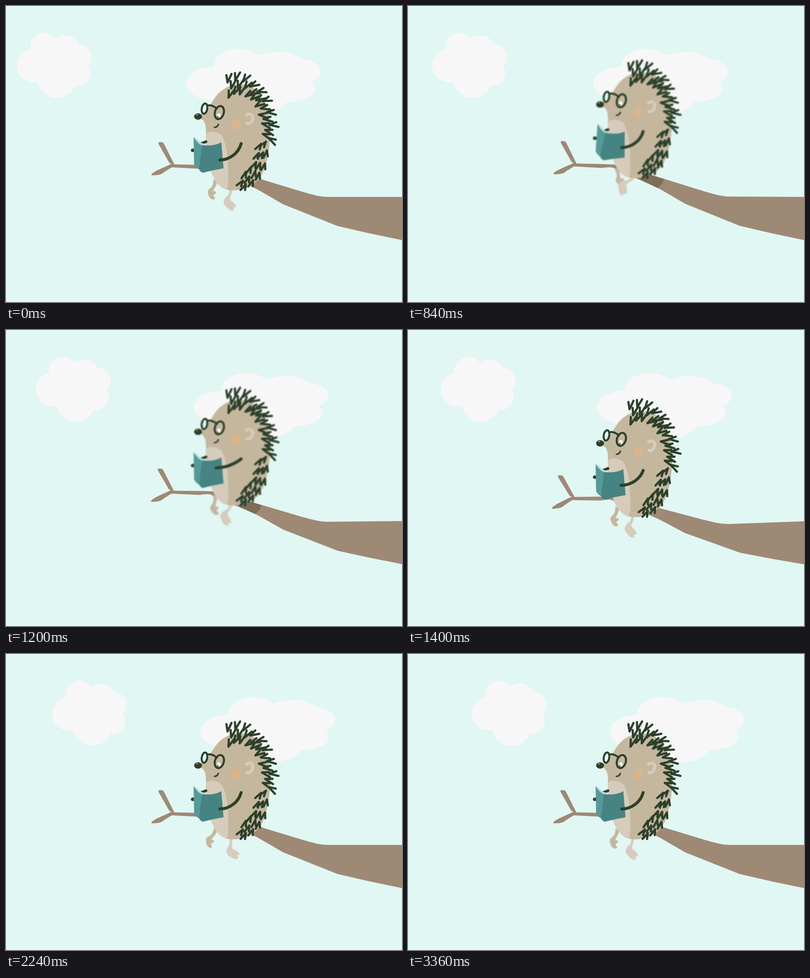
An HTML page with a canvas that plays this animation: 800 px wide and 600 px high, repeating every 3.4 s.

```html
<!DOCTYPE html>
<html lang="en">
<head>
<meta charset="utf-8">
<title>Reading hedgehog</title>
<style>
html, body { margin: 0; width: 100%; height: 100%; overflow: hidden; background: #e0f7f4; }
canvas { display: block; }
</style>
</head>
<body>
<canvas id="stage" width="800" height="600"></canvas>
<script>
const LOOP = 3400, W = 800, H = 600, RAD = Math.PI / 180;
const main = document.getElementById('stage').getContext('2d');
const layer = document.createElement('canvas');
layer.width = W;
layer.height = H;
const ctx = layer.getContext('2d');

const C = {
  sky: '#e0f7f4', cloud: '#f7f7f7', bark: '#9e8974', shade: '#7f6d55',
  fur: '#c5b79e', pale: '#d7ccbb', dark: '#2b402b', cheek: '#dbb58a',
  cover: '#458482', inside: '#559a99', page: '#b9dfdc'
};

// Eases from 0 up to 1 at the peak and back to 0.
function bump(t, from, peak, to) {
  if (t <= from || t >= to) return 0;
  const u = t < peak ? (peak - t) / (peak - from) : (t - peak) / (to - peak);
  return (1 + Math.cos(Math.PI * u)) / 2;
}

// Crouch, jump and landing; the branch, book, arm and feet follow.
function poseAt(t) {
  const crouch = bump(t, 0, 600, 740), jump = bump(t, 660, 1000, 1360);
  const arm = bump(t, 800, 1150, 1500);
  const dangle = t > 1600 && t < 3360 ? 24 * Math.sin(2 * Math.PI * (t - 1600) / 704) : 0;
  const feet = 43 * bump(t, 0, 650, 1600) + dangle;
  return {
    rise: 5.5 * crouch - 48 * jump + 4 * bump(t, 1320, 1420, 1650) - 2 * bump(t, -300, 0, 300),
    lean: crouch,
    bend: 4.1 * bump(t, 0, 620, 850) - 2.35 * bump(t, 800, 1000, 1250) + 2.2 * bump(t, 1100, 1350, 1700),
    glasses: 5.5 * bump(t, 800, 1000, 1200) - 6 * bump(t, 300, 600, 800),
    book: bump(t, 760, 1000, 1200),
    armX: -8 * arm,
    armY: -16 * arm,
    front: feet,
    back: -.85 * feet,
    airborne: t > 700 && t < 1400
  };
}

function fill(g, path, color) {
  g.fillStyle = color;
  g.fill(new Path2D(path));
}

function line(path, color, width) {
  ctx.strokeStyle = color;
  ctx.lineWidth = width;
  ctx.stroke(new Path2D(path));
}

function oval(g, x, y, rx, ry, color, turn = 0) {
  g.beginPath();
  g.ellipse(x, y, rx, ry, turn * RAD, 0, 7);
  g.fillStyle = color;
  g.fill();
}

function ring(x, y, rx, ry, turn) {
  ctx.beginPath();
  ctx.ellipse(x, y, rx, ry, turn * RAD, 0, 7);
  ctx.strokeStyle = C.dark;
  ctx.lineWidth = 4;
  ctx.stroke();
}

function turned(g, x, y, deg, draw) {
  g.save();
  g.translate(x, y);
  g.rotate(deg * RAD);
  g.translate(-x, -y);
  draw();
  g.restore();
}

function clouds(t) {
  const puff = (x, y, rx, ry = rx) => oval(main, x, y, rx, ry, C.cloud);
  main.save();
  main.translate(t * .0317, 0);
  puff(77, 82, 28);
  puff(119, 92, 32);
  puff(147, 103, 26);
  puff(144, 136, 26);
  puff(103, 146, 40);
  puff(56, 121, 34);
  puff(100, 115, 36);
  main.restore();

  main.save();
  main.translate(t * .0129, 0);
  puff(420, 157, 56, 34);
  puff(470, 119, 49, 32);
  puff(550, 128, 60, 35);
  puff(595, 133, 41, 25);
  puff(570, 168, 54, 27);
  puff(505, 178, 68, 42);
  puff(500, 145, 60, 35);
  main.restore();
}

function branch(p) {
  turned(main, 821, 425, -p.bend, () => {
    fill(main, `M870 387 L650 387 C635 387 618 382 600 377 L515 351 L475 339 L420 323 L387 322 L340 321
      L319 279 Q317 275 309 276 Q307 277 309 281 L330 318 L334 320 C320 327 298 335 294 341
      Q292 344 300 343 Q313 343 319 337 Q328 331 335 327 L392 330 Q404 328 413 329 L430 337
      L455 347 L488 362 L510 373 L560 402 L670 446 L735 461 L870 489 Z`, C.bark);
    if (p.airborne) fill(main, 'M460 350 Q474 340 488 343 L517 352 Q514 363 504 370 Z', C.shade);
  });
}

// Pairs of bristles around the back, fanned at the head and combed down below.
function makeSpikes() {
  let seed = 29;
  const jitter = n => n * ((seed = (seed * 16807) % 2147483647) / 2147483647 - .5);
  const path = new Path2D(), count = 42;
  for (let i = 0; i < count; i++) {
    const a = -113 + 192 * i / (count - 1), ring = .82 + .12 * (i * 2 % 3) + jitter(.06);
    const x = 468 + 60 * ring * Math.cos(a * RAD), y = 262 + 102 * ring * Math.sin(a * RAD);
    const low = a > 8, heading = (low ? 112 : -80 + .85 * (a + 113)) + jitter(30);
    for (const side of [-1, 1]) {
      const dir = (heading + side * 17) * RAD, len = (low ? 14 : 17) + side * 2;
      path.moveTo(x, y);
      path.lineTo(x + len * Math.cos(dir), y + len * Math.sin(dir));
    }
  }
  return path;
}
const spikes = makeSpikes();

function legs(p) {
  turned(ctx, 423, 359, p.back, () => fill(ctx, `M419 354 L427 356 C426 368 419 372 419 378
    C425 376 426 382 421 384 Q418 385 420 388 Q424 391 421 394 C413 396 409 388 408 381
    C406 375 412 372 415 369 Q419 364 419 354 Z`, C.fur));
  turned(ctx, 454, 375, p.front, () => fill(ctx, `M451 370 L457 371 C457 384 452 388 453 394
    C456 400 463 401 462 404 Q466 407 464 410 Q462 411 459 409 Q462 414 459 417
    C452 419 446 410 441 405 C437 398 443 390 447 387 C451 383 451 379 451 370 Z`, C.pale));
}

function body() {
  fill(ctx, `M393 222 C405 219 411 205 420 191 C438 163 465 157 490 163 C520 174 537 222 534 262
    C531 310 522 350 500 363 C480 375 465 377 450 375 C430 371 418 350 413 333
    C406 310 403 285 404 258 C404 243 402 234 393 230 Z`, C.fur);
  fill(ctx, `M404 262 C408 254 426 256 435 264 C445 278 450 312 449 352 C449 365 448 372 445 374
    C430 371 418 350 413 335 C406 310 403 285 404 262 Z`, C.pale);
  oval(ctx, 465, 243, 8.5, 11, C.cheek, 24);
  line('M486 223 C492 218 501 223 498 232 C496 239 490 242 487 240', C.pale, 6);
  ctx.strokeStyle = C.dark;
  ctx.lineWidth = 4.4;
  ctx.stroke(spikes);
}

function face(p) {
  oval(ctx, 388, 226, 8, 6.5, C.dark);
  oval(ctx, 386, 222.5, 2.2, 1, C.fur);
  line('M421 248 Q427 248 429 242', C.dark, 3);
  oval(ctx, 430, 224, 3.4, 4.6, '#fff');
  oval(ctx, 428, 227, 1.4, 1.8, C.dark);
  ctx.save();
  ctx.translate(0, p.glasses);
  oval(ctx, 401, 210, 5, 10, C.sky, 10);
  ring(401, 210, 5.6, 10.5, 10);
  ring(431, 218, 9, 13.5, 16);
  line('M407 204 C414 201 421 206 426 210', C.dark, 4);
  ctx.restore();
}

function book(p) {
  line('M394 281 L404 277', C.dark, 5.5);
  oval(ctx, 377.5, 294.5, 4, 3.5, C.dark);
  ctx.save();
  ctx.translate(2 * p.book, p.book);
  turned(ctx, 409, 305, 20 * p.book, () => {
    fill(ctx, 'M379 268 Q385 270 389 275 Q395 282 405 281 L398 286 L388 280 Z', C.page);
    fill(ctx, 'M379 268 C384 275 389 282 397 285 L392 334 Q384 331 380 323 Z', C.inside);
    fill(ctx, 'M396 284 C412 286 426 284 435 278 L439.5 331 Q416 335 398 340 Q393 339 390 333 Z', C.cover);
  });
  ctx.restore();
  const x = 432 + p.armX, y = 314 + p.armY;
  line(`M475 281 C470 ${y - 14} 452 ${y} ${x} ${y}`, C.dark, 6);
}

function hedgehog(p) {
  ctx.clearRect(0, 0, W, H);
  ctx.save();
  ctx.lineCap = ctx.lineJoin = 'round';
  ctx.translate(0, p.rise);
  turned(ctx, 460, 255, p.lean, () => {
    legs(p);
    body();
    face(p);
    book(p);
  });
  ctx.restore();
  main.save();
  if (p.airborne) main.filter = 'blur(0.8px)';
  main.drawImage(layer, 0, 0);
  main.restore();
}

function draw(t) {
  const pose = poseAt(t);
  main.fillStyle = C.sky;
  main.fillRect(0, 0, W, H);
  clouds(t);
  branch(pose);
  hedgehog(pose);
}

const start = performance.now();
function tick() {
  draw((performance.now() - start) % LOOP);
  requestAnimationFrame(tick);
}
tick();
</script>
</body>
</html>
```
